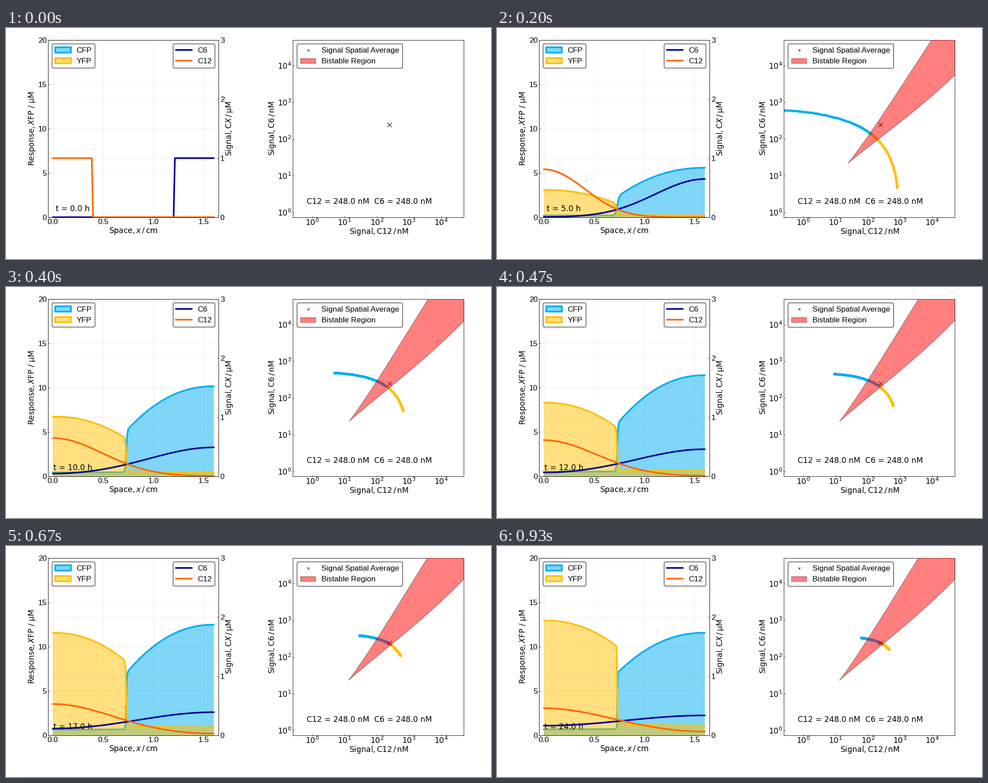
Recreate the animation shown at these times as a matplotlib script. Size 1084 by 516 pixels, loop 0.99 s.

```python
import numpy as np
import matplotlib.pyplot as plt
from matplotlib.animation import FuncAnimation
from matplotlib.patches import FancyBboxPatch, Polygon, Rectangle

W, H, DPI = 1084, 516, 72
FRAMES, HOURS = 15, 24
CYAN, YELLOW, NAVY, ORANGE, RED = "#00aeef", "#ffc000", "#00009b", "#ff6600", "#ff0000"
SIZE, SANS = 17.2, "Liberation Sans"

# --- model -----------------------------------------------------------------
N, LENGTH = 125, 1.6
x = np.linspace(0, LENGTH, N)
modes = np.cos(np.outer(np.arange(N), np.pi * (np.arange(N) + 0.5) / N))
wave = np.pi * np.arange(N) / (N * x[1])
c12_start = (np.arange(N) < 31).astype(float)
c6_start = c12_start[::-1]


def diffuse(start, rate, t):
    """Diffusion with closed ends, solved in cosine modes."""
    coef = modes @ start * 2 / N
    coef[0] /= 2
    return (coef * np.exp(-rate * t * wave ** 2)) @ modes


def gate(z):
    return 1 / (1 + np.exp(-np.clip(z, -60, 60)))


def ramp(dist, slope, low, high, soft):
    """Straight rise with rounded ends."""
    line = -soft * np.logaddexp(-slope * dist / soft, -high / soft)
    return 0.08 * np.logaddexp(line / 0.08, low / 0.08)


def plateau(dist, span, low, edge, peak, width, tail):
    """Low level on one side of the front, rising arc on the other."""
    u = np.clip(dist / span, 0, 1)
    arc = edge + (peak - edge) * (1 - (1 - u) ** 2.15)
    base = low * (1 + tail * np.exp(np.minimum(dist, 0) / 0.25))
    return base + (arc - base) * gate(dist / width)


FRONT = 0.729
KEYS = np.array([1, 3, 6, 8, 10, 14])
WIDTHS = [0.009, 0.0042, 0.003, 0.0028, 0.0015]
CFP_STATES = [(0.20, 2.3, 5.58), (0.43, 5.1, 10.15), (0.58, 6.55, 12.3),
              (0.63, 7.0, 12.47), (0.66, 7.0, 11.56)]
YFP_STATES = [(0.20, 1.5, 3.09), (0.45, 4.25, 6.73), (0.72, 6.65, 9.79),
              (0.88, 8.3, 11.55), (1.08, 10.0, 12.95)]

cfp_keys = [ramp(x - 0.705, 10.2, 0.15, 5.43, 0.83)]
yfp_keys = [ramp(0.813 - x, 6.74, 0.15, 3.18, 0.2)]
for w, c, y in zip(WIDTHS, CFP_STATES, YFP_STATES):
    cfp_keys.append(plateau(x - FRONT, LENGTH - FRONT, *c, w, 0.07))
    yfp_keys.append(plateau(FRONT - x, FRONT, *y, w, 0.27))


def hermite(values, i):
    values = np.array(values)
    slopes = np.gradient(values, KEYS, axis=0)
    k = min(np.searchsorted(KEYS, i, side="right") - 1, len(KEYS) - 2)
    h = KEYS[k + 1] - KEYS[k]
    s = (i - KEYS[k]) / h
    out = ((1 + 2 * s) * (1 - s) ** 2 * values[k] + s * (1 - s) ** 2 * h * slopes[k]
           + s * s * (3 - 2 * s) * values[k + 1] + s * s * (s - 1) * h * slopes[k + 1])
    return np.maximum(out, 0)


def bezier(p0, p3, f1, f2):
    """Cubic whose handles are given as fractions of the chord box."""
    p0, p3 = np.array(p0), np.array(p3)
    p1, p2 = p0 + (p3 - p0) * f1, p0 + (p3 - p0) * f2
    s = np.linspace(0, 1, 50)[:, None]
    return (1 - s) ** 3 * p0 + 3 * s * (1 - s) ** 2 * p1 + 3 * s * s * (1 - s) * p2 + s ** 3 * p3


TOP = np.log10(5e4)
OUT = TOP + 0.2


def region_outline(i):
    s = gate(1.61 * (i - 4.24))
    tip = (1.417 - 0.298 * s, 1.338 + 0.029 * s)
    roof, side = 4.036 - 0.468 * s, 3.694 + 0.426 * s
    upper = bezier(tip, (roof, TOP), (0.27, 0.228), (0.67, 0.66))
    lower = bezier(tip, (TOP, side), (0.289, 0.288), (0.67, 0.61))
    beyond = [(roof + 0.11, OUT), (OUT, OUT), (OUT, side + 0.17)]
    return 10 ** np.vstack([upper, beyond, lower[::-1]])


# --- stage -----------------------------------------------------------------
plt.rcParams.update({"font.family": "DejaVu Sans", "font.size": SIZE})
fig = plt.figure(figsize=(W / DPI, H / DPI), dpi=DPI, facecolor="white")


def add_axes(x0, x1, y0=26.7, y1=422.7):
    return fig.add_axes([x0 / W, 1 - y1 / H, (x1 - x0) / W, (y1 - y0) / H])


ax = add_axes(94.3, 475.3)
ax.set(xlim=(-10.4 / 224.9, 370.6 / 224.9), ylim=(0, 20),
       xticks=[0, 0.5, 1, 1.5], yticks=range(0, 21, 5))
twin = ax.twinx()
twin.set(ylim=(0, 3), yticks=range(4))
phase = add_axes(641.3, 1023.3)
phase.set(xscale="log", yscale="log", xlim=(0.25, 5e4), ylim=(0.75, 5e4))
decades = 10.0 ** np.arange(5)
phase.set_xticks(decades)
phase.set_yticks(decades)

for a in (ax, twin, phase):
    a.minorticks_off()
    a.tick_params(direction="in", length=3, width=0.8, pad=3.5, labelsize=SIZE)
    for spine in a.spines.values():
        spine.set_linewidth(0.9)
for a in (ax, twin):
    a.tick_params(labelfontfamily=SANS)
    a.set_axisbelow(True)
    a.grid(True, color="black", alpha=0.08, lw=1)
twin.xaxis.grid(False)
phase.tick_params(axis="x", pad=2)

cfp_fill, yfp_fill = (
    ax.add_patch(Polygon([(0, 0), (0, 0)], fc=c, ec="none", alpha=0.5, zorder=z))
    for c, z in ((CYAN, 2), (YELLOW, 3)))
cfp_line, = ax.plot([], [], color=CYAN, lw=3.8, zorder=2.5, solid_capstyle="round")
yfp_line, = ax.plot([], [], color=YELLOW, lw=3.8, zorder=3.5, solid_capstyle="round")
c6_line, = twin.plot([], [], color=NAVY, lw=3.6, solid_capstyle="round")
c12_line, = twin.plot([], [], color=ORANGE, lw=3.6, solid_capstyle="round")
clock = ax.text(44.7 / 224.9, 20.8 / 19.8, "", ha="center", va="center_baseline", zorder=5)

cyan_dots, = phase.plot([], [], "o", color=CYAN, ms=6, mew=0, zorder=2)
yellow_dots, = phase.plot([], [], "o", color=YELLOW, ms=6, mew=0, zorder=2)
mean12, mean6 = 1000 * c12_start.mean(), 1000 * c6_start.mean()
phase.plot([mean12], [mean6], "x", color="black", ms=10.5, mew=1.1, zorder=3)
region = phase.add_patch(Polygon([(1, 1), (2, 2)], fc=RED, ec="black", lw=1,
                                 alpha=0.5, zorder=4))

# --- labels and legends, in stage pixels -------------------------------------
top = fig.add_axes([0, 0, 1, 1], zorder=10)
top.set(xlim=(0, W), ylim=(H, 0))
top.axis("off")


def label(px, py, text, rotation=0):
    top.text(px, py, text, ha="center", va="center", rotation=rotation)


label(285, 453.3, r"Space,$\,x\,/\,$cm")
label(833, 455.5, r"Signal,$\,$C12$\,/\,$nM")
label(58.7, 224.5, "Response,$\\,X$FP / \u00b5M", 90)
label(499.3, 224.5, "Signal,$\\,$C$X\\,/\\,$\u00b5M", 90)
label(595.3, 224.5, r"Signal,$\,$C6$\,/\,$nM", 90)
top.text(812.5, 393, f"C12 = {mean12:.1f} nM  C6 = {mean6:.1f} nM", ha="center")


def legend_box(x0, x1, text_x, names, y1=89.5):
    top.add_patch(FancyBboxPatch((x0, 35.5), x1 - x0, y1 - 35.5, fc="white", ec="black",
                                 lw=1, boxstyle="round,pad=0,rounding_size=3.5"))
    for name, py in zip(names, (54.8, 79)):
        top.text(text_x, py, name, family=SANS)


def swatch(x0, y0, w, h, color, edge, lw):
    top.add_patch(Rectangle((x0, y0), w, h, fc=color, alpha=0.5, ec="none"))
    top.add_patch(Rectangle((x0, y0), w, h, fc="none", ec=edge, lw=lw))


legend_box(103, 199, 157.5, ("CFP", "YFP"))
swatch(109.5, 42.5, 35, 12, CYAN, CYAN, 3.6)
swatch(109.5, 67, 35, 12, YELLOW, YELLOW, 3.6)
legend_box(373.5, 467, 428, ("C6", "C12"))
top.plot([380, 415], [48.6, 48.6], color=NAVY, lw=3.6)
top.plot([380, 415], [73, 73], color=ORANGE, lw=3.6)
legend_box(650.5, 886.5, 705, ("Signal Spatial Average", "Bistable Region"), 90)
top.plot([674.5], [48.8], "x", color="black", ms=5, mew=0.8)
swatch(657.5, 67.5, 34.5, 11.5, RED, (0.3, 0, 0, 0.5), 1)


# --- animation ---------------------------------------------------------------
def update(i):
    t = HOURS * i / (FRAMES - 1)
    c6, c12 = diffuse(c6_start, 0.018, t), diffuse(c12_start, 0.009, t)
    cfp, yfp = (hermite(k, i) if i else np.zeros(N) for k in (cfp_keys, yfp_keys))
    for line, fill, y in ((cfp_line, cfp_fill, cfp), (yfp_line, yfp_fill, yfp)):
        line.set_data(x, y)
        fill.set_xy(np.column_stack([np.r_[0, x, LENGTH], np.r_[0, y, 0]]))
    c6_line.set_data(x, c6)
    c12_line.set_data(x, c12)
    clock.set_text(f"t = {round(t):.1f} h")

    a, b = np.maximum(1000 * c12, 1e-6), np.maximum(1000 * c6, 1e-6)
    blue = cfp > yfp
    cyan_dots.set_data(a[blue], b[blue])
    yellow_dots.set_data(a[~blue], b[~blue])
    region.set_visible(i > 0)
    region.set_xy(region_outline(i))
    return []


anim = FuncAnimation(fig, update, frames=FRAMES, interval=66, repeat=True,
                     repeat_delay=0, blit=False)
plt.show()
```
